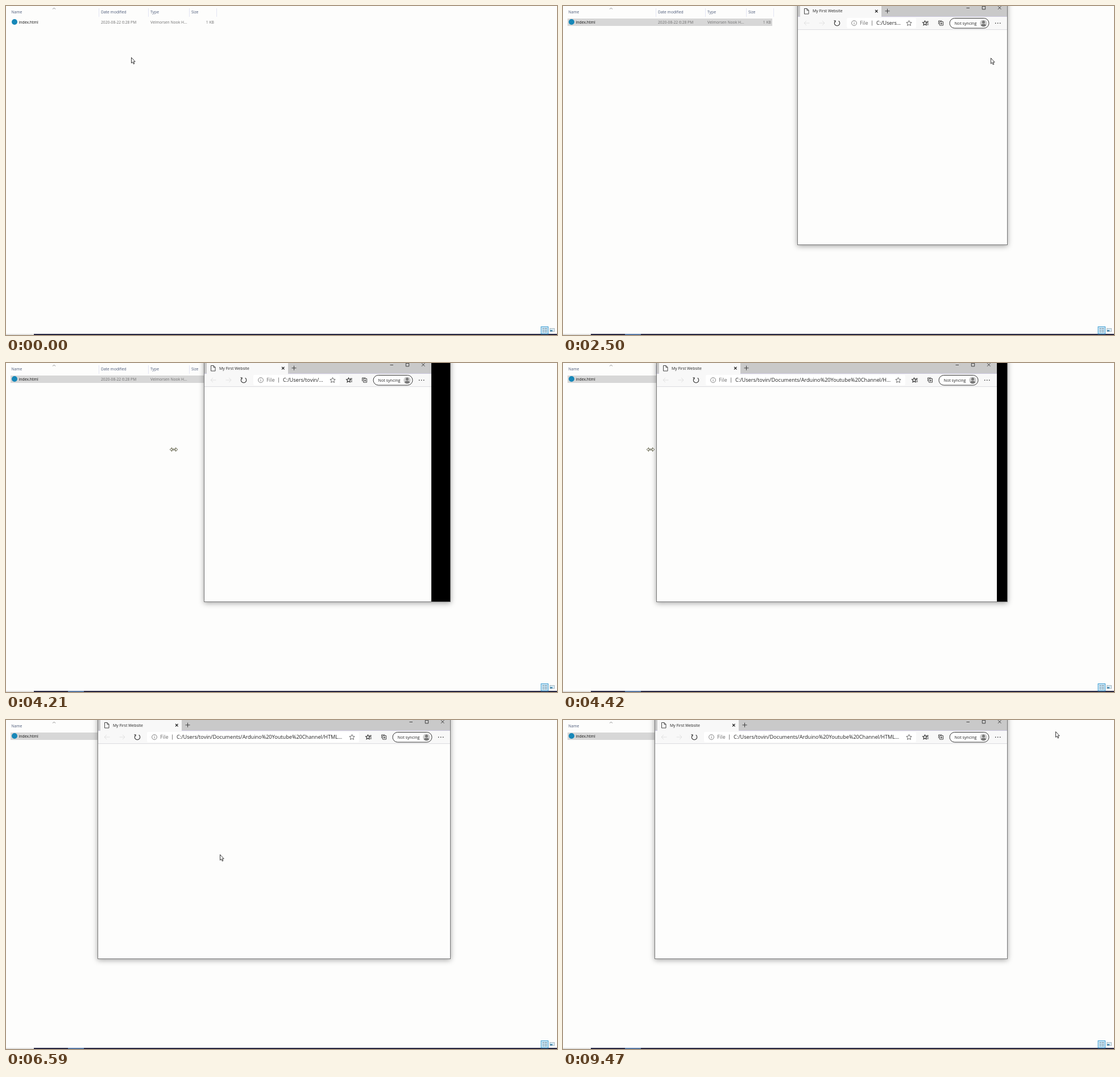
These frames come from a looping animation (969 by 578 pixels, 9510 ms). An HTML page:

```html
<!DOCTYPE html>
<html lang="en">
<meta charset="utf-8">
<title>Resizing a browser window</title>
<style>
  html, body { margin: 0; width: 100%; height: 100%; overflow: hidden; background: #fdfdfc; }
  body, svg text { font-family: "Open Sans", "Noto Sans", sans-serif; }
  svg { position: absolute; left: 0; top: 0; overflow: visible; fill: none; }
  text { stroke: none; }
  #desktop { font-size: 6.75px; }
  #win { position: absolute; top: -10px; height: 430px; box-sizing: border-box; overflow: hidden;
    border: 1px solid #777; background: #000; box-shadow: 0 2px 9px rgba(0, 0, 0, .36); }
  #view { position: absolute; left: -1px; top: 9px; height: 420px; background: #fdfdfc; }
  #view div { position: absolute; }
  #titlebar { left: 0; right: 0; top: -9px; height: 27px; background: #c9c9c9; }
  #toolbar { left: 0; right: 0; top: 18px; height: 23px; background: #f8f8f8;
    border-top: 1px solid #c9c5dc; border-bottom: 1px solid #dcdce0; box-sizing: content-box; height: 22px; }
  #field { left: 87px; right: 161px; top: 21px; height: 18px; border-radius: 2px; background: #fff; }
  #path { left: 139px; right: 186px; top: 22px; line-height: 16px; font-size: 9.15px; color: #222;
    white-space: nowrap; overflow: hidden; text-overflow: ellipsis; }
  #view #tools { left: auto; right: 0; }
</style>
<body>
<svg id="desktop" width="969" height="578">
  <rect id="row" x="8.5" y="22.5" width="359" height="12"/>
  <path d="M82 5.5l2.5-2 2.5 2" stroke="#777" stroke-width=".8"/>
  <path d="M163.5 4v15M250.5 4v15M322.5 4v15M370.5 4v15" stroke="#e3e5f3"/>
  <g fill="#4c5a78">
    <text x="9.5" y="13.3">Name</text>
    <text x="167" y="13.3">Date modified</text>
    <text x="254" y="13.3">Type</text>
    <text x="326" y="13.3">Size</text>
  </g>
  <circle cx="15" cy="28" r="5" fill="#1787b8"/>
  <text x="22.5" y="30.7" font-size="6.9" fill="#111">index.html</text>
  <g fill="#707070">
    <text x="167" y="30.7">2020-08-22 6:28 PM</text>
    <text x="254" y="30.7">Velmorsen Nook H...</text>
    <text x="366" y="30.7" text-anchor="end">1 KB</text>
  </g>
  <path d="M0 577h49" stroke="#c4c4c4"/>
  <path d="M49 577h920" stroke="#23233f" stroke-width="2"/>
  <path id="task" d="M109 577h28" stroke="#5475a3" stroke-width="2"/>
  <rect x="941" y="563.5" width="12.5" height="12.5" fill="#cce8f8" stroke="#3c9bd0"/>
  <path d="M943.5 566.5h3m1 0h4m-8 3h3m1 0h4m-8 3h3m1 0h4" stroke="#5a7484" stroke-width=".9"/>
  <rect x="956.5" y="566.5" width="8" height="5.5" fill="#d8ecf6" stroke="#a2adb5" stroke-width=".8"/>
  <path d="M957 570.5h4" stroke="#28729c" stroke-width="2"/>
</svg>

<div id="win"><div id="view">
  <div id="titlebar"></div><div id="toolbar"></div><div id="field"></div>
  <svg width="170" height="45" stroke="#333">
    <path d="M5 -9h143v28H5z" fill="#f8f8f8" stroke="none"/>
    <path d="M12.5 4.5h4.5l3 3v6.5h-7.5zM17 4.5v3h3" stroke-width=".9"/>
    <text x="27" y="11.5" font-size="6.9" fill="#222">My First Website</text>
    <path d="M137 6.8l4.5 4.5m0-4.5l-4.5 4.5" stroke="#111" stroke-width="1.2"/>
    <path d="M154.5 8.8h8m-4-4v8" stroke-width=".9"/>
    <path d="M21.5 30h-9.5m4-4l-4 4 4 4M38.5 30h9.5m-4-4l4 4-4 4" stroke="#dedede" stroke-width=".9"/>
    <path d="M67.3 26.2a4.7 4.7 0 1 0 5.4 0M67 28.5v-2.8h-2.6" stroke-width="1.1"/>
    <g stroke="#777" stroke-width=".9">
      <circle cx="100" cy="30" r="4.4"/><path d="M100 29.3v3m0-5v1"/><path d="M131.5 25.5v9"/>
    </g>
    <text x="110" y="33.4" font-size="9.2" fill="#6b6b6b">File</text>
  </svg>
  <div id="path">C:/Users/tovin/Documents/Arduino%20Youtube%20Channel/HTML%20Tutorial/index.html</div>
  <div id="tools" style="width:210px;height:45px">
    <svg width="210" height="45" stroke="#333" stroke-width=".9">
      <path d="M137.5 3.5h5.5M165.3 -2.5h5.4v8h-5.4z" stroke="none"/>
      <path d="M137.5 3.5h5.5M165.3 .5h5.4v5.4h-5.4zM193 .3l5.5 5.5m0-5.5l-5.5 5.5"/>
      <path id="star" d="M36.5 25.5l1.4 3 3.2.4-2.4 2.2.7 3.2-2.9-1.6-2.9 1.6.7-3.2-2.4-2.2 3.2-.4z" stroke="#555"/>
      <path d="M64.5 26l1.2 2.6 2.7.3-2 1.9.6 2.8-2.5-1.4-2.5 1.4.6-2.8-2-1.9 2.7-.3zM67 27.2h4M68.5 30h2.5M68 32.8h3" stroke-width="1.1"/>
      <path d="M90.5 27.5h6v6.5h-6zM88.5 32v-6h6M93.5 29v3.6m-1.8-1.8h3.6"/>
      <rect x="108" y="21.5" width="69" height="17.5" rx="8.75" fill="#fff" stroke-width="1"/>
      <text x="116.5" y="32.6" font-size="7.15" fill="#222">Not syncing</text>
      <g stroke="none">
        <circle cx="167.5" cy="30.2" r="6.3" fill="#cfcfcf"/>
        <circle cx="167.5" cy="28.2" r="2.5" fill="#777"/>
        <path d="M163 34.5q0-3 4.5-3t4.5 3q-4.5 3.6-9 0z" fill="#777"/>
        <path d="M188 29.5h1.4v1.4h-1.4zm4 0h1.4v1.4h-1.4zm4 0h1.4v1.4h-1.4z" fill="#333"/>
      </g>
    </svg>
  </div>
</div></div>

<svg width="969" height="578"><g id="cursor">
  <g id="arrow">
    <path d="M.5 .5v9.8l2.2-2 1.6 3.7 1.5-.7-1.5-3.5h2.9z" fill="#fff" stroke="#222" stroke-width=".9"/>
    <circle id="busy" cx="8.5" cy=".5" r="3.5" fill="#d9f0fb" stroke="#1b78bd" stroke-width="2.3"/>
  </g>
  <path id="resize" d="M-6.8 0l3.5-3.2v2.3h6.6v-2.3l3.5 3.2-3.5 3.2v-2.3h-6.6v2.3z" fill="#fff" stroke="#47472b" stroke-width=".9"/>
</g></svg>

<script>
  const LOOP = 9510, RIGHT = 782, GRIP = 7;
  const byId = id => document.getElementById(id);
  const [row, task, win, view, cursor, arrow, busy, resize] =
    ['row', 'task', 'win', 'view', 'cursor', 'arrow', 'busy', 'resize'].map(byId);

  // Pointer stops: time, x, y
  const stops = [
    [40, 220, 90], [670, 54, 26], [1340, 54, 26], [1920, 912, 76], [2290, 876, 90],
    [2920, 400, 92], [3290, 404, 150], [3550, 405, 152], [4051, 405, 152], [4400, 154, 152],
    [4560, 154, 152], [5010, 222, 9], [5170, 223, 7], [5879, 223, 7], [5880, 286, 26],
    [6090, 286, 26], [6500, 400, 230], [7050, 66, 309], [7510, 123, 590], [8970, 123, 590],
    [9350, 905, 45], [9470, 866, 20]
  ];
  const clamp = v => Math.min(1, Math.max(0, v));
  const smooth = v => v * v * (3 - 2 * v);

  function pointer(t) {
    const i = stops.findIndex(s => s[0] > t);
    if (i === 0) return stops[0].slice(1);
    if (i < 0) return stops.at(-1).slice(1);
    const [t0, x0, y0] = stops[i - 1], [t1, x1, y1] = stops[i];
    const k = smooth((t - t0) / (t1 - t0));
    return [x0 + (x1 - x0) * k, y0 + (y1 - y0) * k];
  }

  // The frame trails the pointer, and the page layout trails the frame.
  const windowLeft = t => Math.round(pointer(Math.min(4400, Math.max(4051, t - 45)))[0] + GRIP);

  function paintRow(t, y) {
    const [fill, stroke] = t >= 2340 ? ['#d7d7d7', '#d7d7d7']
      : t >= 1170 ? ['#cce8ff', '#99d1ff']
      : y < 34 ? ['#e5f3ff', '#e5f3ff'] : ['none', 'none'];
    row.setAttribute('fill', fill);
    row.setAttribute('stroke', stroke);
  }

  const show = (el, on) => el.style.display = on ? '' : 'none';

  function draw(t) {
    const [x, y] = pointer(t), left = windowLeft(t), opened = clamp((t - 2300) / 220);
    const grow = 1 - (1 - opened) ** 3;
    paintRow(t, y);
    show(task, t >= 2340);

    show(win, t >= 2340);
    win.style.left = left + 'px';
    win.style.width = RIGHT - left + 'px';
    win.style.opacity = grow;
    win.style.transform = opened < 1 ? `scale(${.9 + .1 * grow})` : 'none';
    view.style.width = RIGHT - windowLeft(t - 40) + 'px';

    const resizing = t >= 3250 && t < 4580;
    show(resize, resizing);
    show(arrow, !resizing);
    show(busy, t >= 1380 && t < 2500);
    cursor.setAttribute('transform', `translate(${Math.round(x)} ${Math.round(y)})`);
  }

  function tick() {
    draw(performance.now() % LOOP);
    requestAnimationFrame(tick);
  }
  tick();
</script>
</body>
</html>
```
